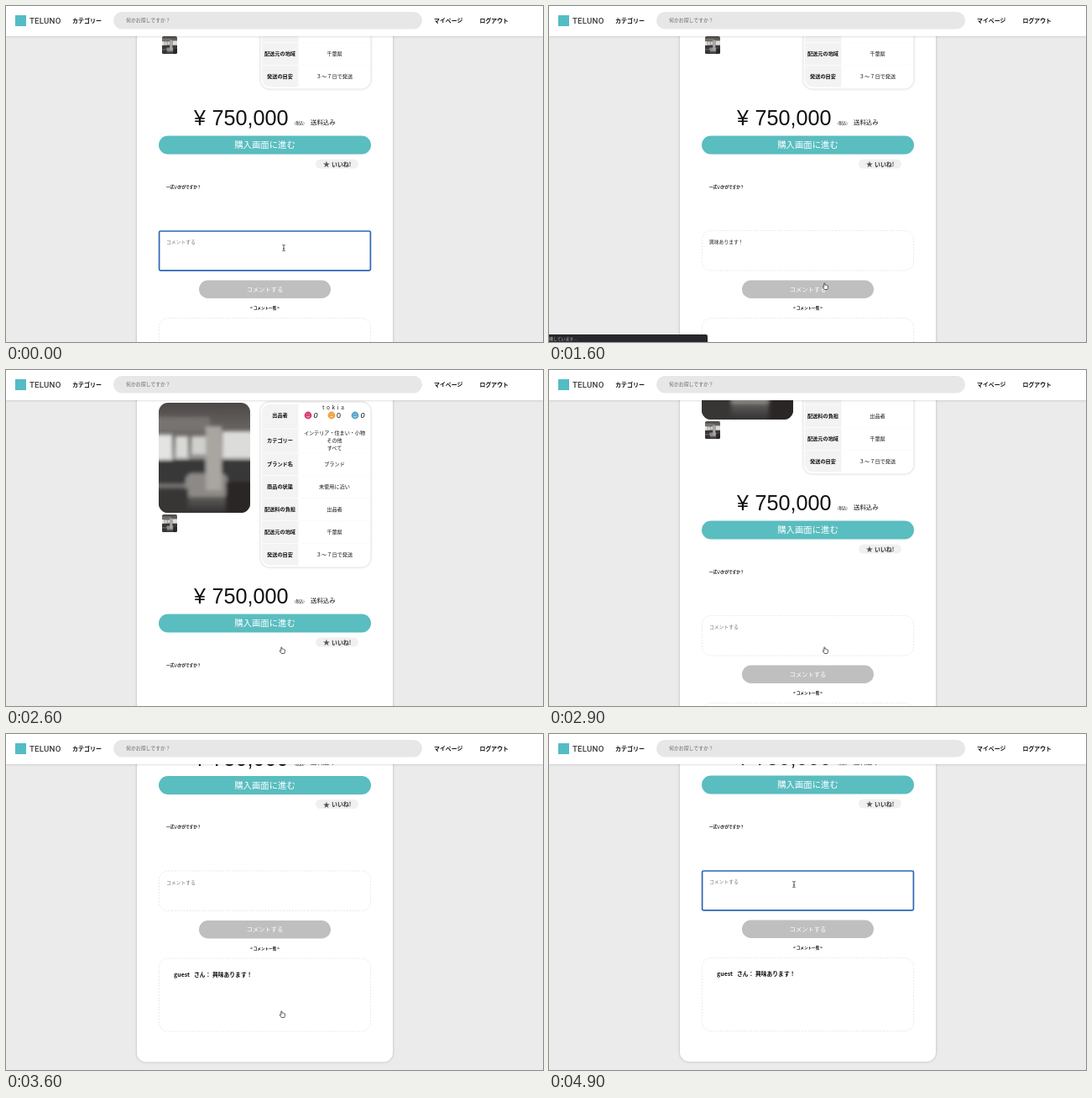
Animation, 640 px wide and 400 px high, one loop 5 s. Source, as an HTML page:

```html
<!DOCTYPE html>
<html lang="ja">
<head>
<meta charset="utf-8">
<style>
html, body { margin: 0; width: 100%; height: 100%; overflow: hidden; background: #ebebeb; }
svg { display: block; width: 640px; height: 400px; font-family: "Noto Sans CJK JP", "Noto Sans CJK", sans-serif; }
text { white-space: pre; }
.mid { text-anchor: middle; }
.bold { font-weight: 700; }
.latin { font-family: "Liberation Sans", Arial, sans-serif; }
.brand { font-family: Roboto, sans-serif; font-weight: 500; letter-spacing: .2px; }
.soft { filter: drop-shadow(0 .5px 1.6px rgba(0,0,0,.24)); }
</style>
</head>
<body>
<svg id="stage" viewBox="0 0 640 400"></svg>
<script>
// cy is the optical middle of the line
const text = (x, cy, size, str, cls = '', fill = '#111', attrs = '') =>
  `<text x="${x}" y="${cy + size * .37}" font-size="${size}" class="${cls}" fill="${fill}" ${attrs}>${str}</text>`;
const box = (x, y, w, h, r, fill, attrs = '') =>
  `<rect x="${x}" y="${y}" width="${w}" height="${h}" rx="${r}" fill="${fill}" ${attrs}/>`;
const dashed = 'stroke="#e2e2e2" stroke-width=".8" stroke-dasharray="2 1.6"';

const photo = `
  <g id="photo" clip-path="url(#frame)">
    ${box(0, 0, 109, 131, 0, 'url(#room)')}
    <g filter="url(#blur)">
      ${box(-5, 17, 66, 17, 0, '#77736f')}
      ${box(-4, 38, 20, 31, 0, '#e4e5e3')}${box(20, 40, 15, 26, 0, '#d9dad8')}${box(39, 40, 19, 22, 0, '#cfcfcd')}
      ${box(76, 34, 38, 32, 0, '#dcdcda')}
      ${box(-5, 68, 120, 28, 0, '#393738')}
      ${box(32, 84, 50, 28, 8, '#8d8986')}
      ${box(56, 28, 19, 76, 0, '#a9a6a2')}
      ${box(-5, 102, 40, 34, 0, '#373435')}${box(80, 94, 35, 40, 0, '#292728')}
    </g>
  </g>`;

const rows = [
  [128, '出品者'],
  [158, 'カテゴリー'],
  [186, 'ブランド名', 'ブランド'],
  [213, '商品の状態', '未使用に近い'],
  [240, '配送料の負担', '出品者'],
  [267, '配送元の地域', '千葉県'],
  [294, '発送の目安', '３〜７日で発送']
];
const edges = [144, 173, 199.5, 226.5, 253.5, 280.5];

const face = (x, fill) => `<circle cx="${x}" cy="128" r="4.4" fill="${fill}"/>
  <path d="M${x - 2} 129q2 2.4 4 0M${x - 1.8} 126.7h1M${x + .8} 126.7h1" fill="none" stroke="#fff" stroke-width=".7"/>`;

const table = box(303.5, 112.5, 131, 196, 11, '#fff', 'class="soft"') +
  `<path d="M348.5 114.5H315a10 10 0 0 0-10 10v172a10 10 0 0 0 10 10h33.5z" fill="#f3f3f3"/>` +
  edges.map(y => box(305, y - .5, 128, 1, 0, '#fbfbfb')).join('') +
  rows.map(([y, label, value = '']) =>
    text(326.5, y, 6.2, label, 'mid bold') + text(391.5, y, 6.2, value, 'mid')).join('') +
  ['インテリア・住まい・小物', 'その他', 'すべて'].map((s, i) => text(391.5, 149 + i * 9, 6.1, s, 'mid')).join('') +
  text(377, 118.5, 6.6, 'tokia', '', '#222', 'letter-spacing="2.6"') +
  face(360, '#d93a73') + face(388, '#f3a13a') + face(416, '#5ba3cf') +
  [369, 396.5, 425].map((x, i) =>
    text(x, 128, 9, '0', 'mid latin', '#111', i == 1 ? '' : 'font-style="italic"')).join('');

const page = box(156, 71, 305, 634, 11, '#fff', 'class="soft"') +
  text(308, 91, 10.4, 'インテリア', 'mid bold') +
  `<g transform="translate(182 113)">${photo}</g>
   <use href="#photo" transform="translate(186 246) scale(.165 .16)"/>` +
  table +
  text(231, 343, 25, '¥', 'mid latin') + text(245.5, 343, 25.2, '750,000', 'latin') +
  text(344, 349.5, 4.4, '(税込)') + text(363, 348, 7.4, '送料込み') +
  box(182, 364.5, 253, 22, 11, '#5abdc0') + text(308.5, 375.5, 10.4, '購入画面に進む', 'mid', '#fff') +
  box(369, 392.5, 51, 11, 5.5, '#f0f0f0') +
  text(377.8, 398, 8.4, '★', '', '#555') + text(388, 398, 6.9, 'いいね!', 'bold', '#333') +
  text(191, 425, 4.6, '一式いかがですか？', 'bold') +
  `<g id="idle">${box(182.4, 477.4, 252.2, 47.6, 11, '#fff', dashed)}</g>
   <g id="focus">${box(182.6, 478, 251.8, 46.8, 1.5, '#fff', 'stroke="#2d66b4" stroke-width="1.7"')}</g>` +
  text(191, 491, 5.8, '', '', '#777', 'id="field"') +
  box(230, 536.5, 157, 21.5, 10.7, '#bfbfbf') + text(308.5, 547.2, 7.3, 'コメントする', 'mid', '#fff') +
  text(308.5, 569.3, 4.6, '&lt; コメント一覧 &gt;', 'mid bold') +
  box(182.4, 581.6, 252.2, 87, 11, '#fff', dashed) +
  `<g id="comment">${text(200, 600.5, 7, 'guest', 'bold')}${text(224, 600.5, 6.8, 'さん： 興味あります！', 'bold')}</g>`;

const header = box(0, -5, 640, 41, 0, '#fff', 'class="soft"') +
  box(11, 11, 13, 13, 0, '#54bcc4') +
  text(28, 17.2, 9.7, 'TELUNO', 'brand', '#3b3b3b') +
  text(79, 17, 7, 'カテゴリー', 'bold') +
  box(128, 7, 368, 20.5, 10.2, '#e7e7e7') + text(143, 17, 5.9, '何かお探しですか？', '', '#666') +
  text(510, 17, 6.9, 'マイページ', 'bold') + text(564.5, 17, 6.9, 'ログアウト', 'bold');

const cursors = `
  <g id="beam" fill="none"><path d="M-1.7-3.6Q0-3.6 0-2.6V2.6Q0 3.6-1.7 3.6M1.7-3.6Q0-3.6 0-2.6M0 2.6Q0 3.6 1.7 3.6M-1 .9H1" stroke="#333" stroke-width=".8"/></g>
  <path id="hand" d="M-1.7 0V-3.2Q-1.2-4-.6-3.2V-1.4Q.2-1.8.7-1.1Q1.5-1.5 1.9-.8Q3-1 3 .2V1.8L2.2 4H-1.2L-3.2 1.2Q-3.3 0-2.4.3L-1.7 1z" fill="#fff" stroke="#333" stroke-width=".8"/>`;

const stage = document.getElementById('stage');
stage.innerHTML = `
  <defs>
    <linearGradient id="room" x2="0" y2="1">
      <stop offset="0" stop-color="#4b4847"/><stop offset=".27" stop-color="#6b6865"/>
      <stop offset=".5" stop-color="#8f8c89"/><stop offset=".8" stop-color="#6f6c6a"/><stop offset="1" stop-color="#343233"/>
    </linearGradient>
    <clipPath id="frame">${box(0, 0, 109, 131, 11, '#000')}</clipPath>
    <filter id="blur"><feGaussianBlur stdDeviation="2.2"/></filter>
  </defs>
  ${box(0, 0, 640, 400, 0, '#ebebeb')}
  <g id="page">${page}</g>
  ${header}
  <g id="status">${box(-5, 391, 194, 14, 2, '#29262c')}${text(0, 395.8, 4.9, '機しています...', '', '#b5b3b8')}</g>
  <g id="cursor">${cursors}</g>`;

const el = id => document.getElementById(id);
const show = (id, on) => el(id).setAttribute('visibility', on ? 'visible' : 'hidden');
const smooth = u => u * u * (3 - 2 * u);

// keys: [time, value...]; interpolates between neighbours
function tween(keys, t, ease = u => u) {
  const i = keys.findIndex(k => k[0] > t);
  if (i < 0) return keys[keys.length - 1].slice(1);
  if (!i) return keys[0].slice(1);
  const a = keys[i - 1], b = keys[i], u = ease((t - a[0]) / (b[0] - a[0]));
  return a.slice(1).map((v, j) => v + (b[j + 1] - v) * u);
}

const typed = ['', '', '', 'k', 'きょ', 'きょう', 'きょうみ', '興味', '興味あ', '興味あり', '興味ありま', '興味あります', '興味あります！'];
const scrollKeys = [[2400, 0], [2900, 185], [3200, 246], [3600, 314.5], [4200, 315]];
const mouseKeys = [[1200, 331, 288], [1500, 329.5, 333.5], [3700, 329.5, 333.5], [4200, 292, 179]];

function draw(now) {
  const t = Math.floor(now % 5000 / 100) * 100;
  const reloaded = t >= 1900;
  const y = reloaded ? tween(scrollKeys, t)[0] : 210;
  el('page').setAttribute('transform', `translate(0 ${-y})`);

  const focused = t < 1500 || t >= 4500;
  show('focus', focused);
  show('idle', !focused);
  const value = reloaded ? '' : typed[Math.min(t / 100, typed.length - 1)];
  el('field').textContent = value || 'コメントする';
  el('field').setAttribute('fill', value ? '#222' : '#777');
  show('comment', reloaded);
  show('status', t >= 1500 && !reloaded);

  const [mx, my] = tween(mouseKeys, t, smooth);
  el('cursor').setAttribute('transform', `translate(${mx} ${my})`);
  const beam = t < 1400 || t >= 4100;
  const hidden = t >= 300 && t < 1200;
  show('beam', beam && !hidden);
  show('hand', !beam);
}

const start = performance.now();
function tick() {
  draw(performance.now() - start);
  requestAnimationFrame(tick);
}
tick();
</script>
</body>
</html>
```
